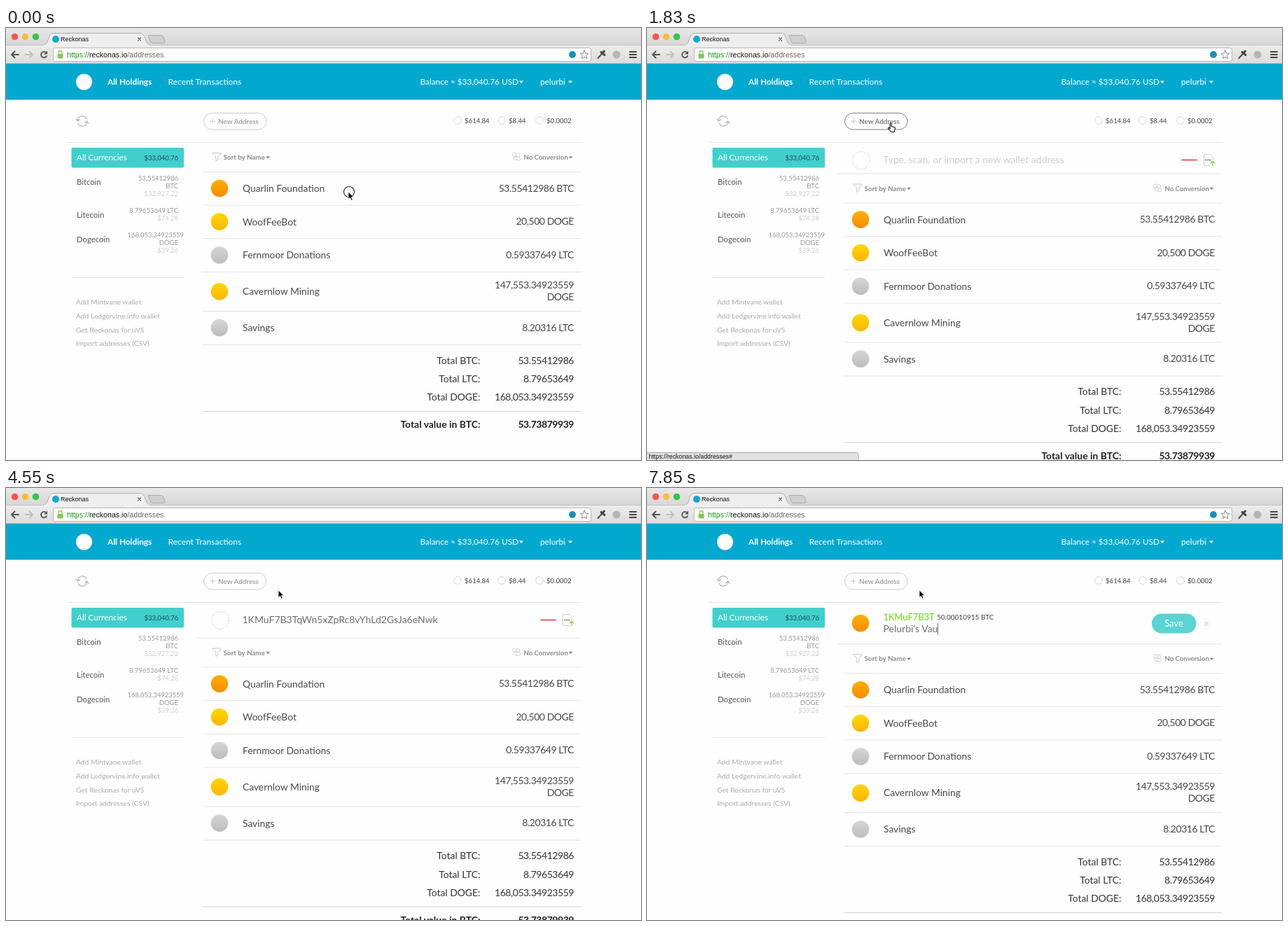
An HTML page that plays this animation: 907x617 px, repeating every 8 s.

```html
<!DOCTYPE html>
<html lang="en">
<head>
<meta charset="utf-8">
<title>Wallet overview</title>
<style>
  html, body { margin: 0; width: 100%; height: 100%; overflow: hidden; background: #fefefe; }
  svg { display: block; width: 100vw; height: 100vh; }
  text { font-family: Lato, "Open Sans", sans-serif; white-space: pre; }
  .chrome { font-family: "Liberation Sans", Arial, sans-serif; }
  .bold { font-weight: 700; }
  .num { letter-spacing: -.45px; }
  .end { text-anchor: end; }
  .line { fill: none; stroke-linecap: round; stroke-linejoin: round; }
</style>
</head>
<body>
<svg id="stage" viewBox="0 0 907 617"></svg>
<script>
const LOOP = 8000;
const SITE = 'reckonas.io';
const NICKNAME = "Pelurbi's Vau";
const ADDRESS = '1KMuF7B3TqWn5xZpRc8vYhLd2GsJa6eNwk';
const ORANGE = 'url(#orange)', YELLOW = 'url(#yellow)', SILVER = 'url(#silver)';

// Markup helpers
const text = (x, y, str, size, fill, cls = '', more = '') =>
  `<text x="${x}" y="${y}" font-size="${size}" fill="${fill}" class="${cls}" ${more}>${str}</text>`;
const rect = (x, y, w, h, fill, more = '') =>
  `<rect x="${x}" y="${y}" width="${w}" height="${h}" fill="${fill}" ${more}/>`;
const disc = (x, y, r, fill, more = '') => `<circle cx="${x}" cy="${y}" r="${r}" fill="${fill}" ${more}/>`;
const path = (d, stroke, width = 1, more = '') =>
  `<path d="${d}" class="line" stroke="${stroke}" stroke-width="${width}" ${more}/>`;
const rule = (x1, x2, y, color = '#e4e4e4') => path(`M${x1} ${y}H${x2}`, color);
const shape = (d, fill, more = '') => `<path d="${d}" fill="${fill}" ${more}/>`;
const dropdown = (x, y, fill) => shape(`M${x} ${y}h6l-3 3.5z`, fill);
const gradient = (id, a, b) =>
  `<linearGradient id="${id}" x2="0" y2="1"><stop stop-color="${a}"/><stop offset="1" stop-color="${b}"/></linearGradient>`;

const defs = `<defs>
  ${gradient('strip', '#e8e8e8', '#d6d6d6')}${gradient('bar', '#ececec', '#dcdcdc')}
  ${gradient('orange', '#fdb000', '#f88a08')}${gradient('yellow', '#ffd800', '#fbb508')}
  ${gradient('silver', '#d6d6d6', '#bcbcbc')}
  <clipPath id="opening"><rect id="openingBox" x="272" y="164" width="550" height="0"/></clipPath></defs>`;

const browser =
  rect(0, 0, 907, 25, 'url(#strip)') + rect(0, 25, 907, 26, 'url(#bar)') + rule(0, 907, 24.5, '#c2c2c2') +
  shape('M53 25C62 24 59 7.500 67 7.500H192C200 7.500 198 24 207 25', '#eee', 'stroke="#adadad"') +
  rect(54, 24, 152, 2, '#eee') +
  shape('M203 10.500H221Q224 10.500 225 13L227 19Q227.500 21.500 224 21.500H209Q207 21.500 206 19Z', '#d0d0d0', 'stroke="#aaa"') +
  ['#fb5650', '#fcbb3f', '#32c547'].map((c, i) => disc(12.5 + 15 * i, 12.5, 4.8, c)).join('') +
  disc(71, 16, 5, '#16a7cc') + text(78, 19.3, 'Reckonas', 9, '#111', 'chrome') +
  path('M188.500 14l4 4m0-4l-4 4', '#555', 1.1) +
  path('M18 38H9M12.500 33.500L8 38l4.500 4.500', '#555', 2) +
  path('M28 38h9M33.500 33.500L38 38l-4.500 4.500', '#c0c0c0', 2) +
  path('M57.500 35.500A4.200 4.200 0 1 0 58 40', '#555', 1.8) + shape('M59 32.500v5h-5z', '#555') +
  rect(67.5, 28.5, 768, 19, '#fff', 'rx="2.500" stroke="#b8b8b8"') +
  rect(73.5, 37, 8, 6.5, '#7fc95b', 'rx="1"') + path('M75 37v-2a2.500 2.500 0 0 1 5 0v2', '#7fc95b', 1.3) +
  text(87, 41.8, `<tspan fill="#149a18">https://</tspan><tspan fill="#111">${SITE}</tspan>/addresses`,
    10.65, '#666', 'chrome') +
  disc(809, 38, 5, '#1c8fb8') +
  path('M826 32l1.800 4 4.200.4-3.200 2.900 1 4.200-3.800-2.200-3.800 2.200 1-4.200-3.200-2.900 4.200-.4z', '#888') +
  path('M845.500 43l5.500-6', '#555', 2.2) + path('M850 34.500l5 4M852.500 35l2-2', '#444', 3) +
  disc(872, 38, 5.5, '#b5b5b5') +
  [34, 38, 42].map(y => path(`M891 ${y}h9`, '#444', 2.1)).join('');

const header =
  rect(0, 51, 907, 51.5, '#03a8cf') + rule(0, 907, 50.5, '#b4bec0') +
  disc(111.5, 77, 11.5, '#fff') +
  text(145, 81, 'All Holdings', 11.8, '#fff', 'bold') +
  text(231.5, 81, 'Recent Transactions', 12, '#fff') +
  text(591.5, 81, 'Balance ≈ $33,040.76 USD', 11.8, '#fff') + dropdown(733, 75.5, '#fff') +
  text(763, 81, 'pelurbi', 11.8, '#fff') + dropdown(803, 75.5, '#fff');

const toolbar =
  path('M102.500 131.500a6.500 6.500 0 0 1 12.500-1.500M115.500 134.500a6.500 6.500 0 0 1-12.500 1.500M100 130l2.500 3 3-2.500M118 136l-2.500-3-3 2.500', '#b5b5b5', 1.2) +
  rect(282.5, 121.5, 89.5, 23.5, '#fff', 'rx="11.750" id="button"') +
  path('M291.500 133h7m-3.500-3.500v7', '#c4c4c4') +
  text(303, 136.5, 'New Address', 10, '#888', '', 'id="buttonLabel"') +
  [[645, '$614.84'], [708, '$8.44'], [762, '$0.0002']].map(([x, price]) =>
    disc(x, 132, 5.3, '#fff', 'stroke="#d6d6d6"') + text(x + 10, 135.6, price, 9.6, '#444')).join('') +
  rule(88, 821, 163.5);

const small = (y, str, fill = '#999') => text(246, y, str, 9.5, fill, 'end');
const sidebar =
  rect(93.5, 171, 160.5, 28.5, '#41cfcc', 'rx="2"') +
  text(101, 189.2, 'All Currencies', 11.8, '#fff') + small(188.5, '$33,040.76', '#1d4c57') +
  text(101, 224, 'Bitcoin', 11.3, '#555') + text(101, 270.5, 'Litecoin', 11.3, '#555') +
  text(101, 305.7, 'Dogecoin', 11.3, '#555') +
  small(217.7, '53.55412986') + small(228.7, 'BTC') + small(240, '$32,927.22', '#ccc') +
  small(264, '8.79653649 LTC') + small(275, '$74.28', '#ccc') +
  text(173.5, 299, '168,053.34923559', 9.4, '#999') + small(310, 'DOGE') + small(321, '$39.26', '#ccc') +
  rule(94, 254, 356.5) +
  ['Add Mintvane wallet', 'Add Ledgervine.info wallet', 'Get Reckonas for uVS', 'Import addresses (CSV)']
    .map((s, i) => text(100, 395 + 19.8 * i, s, 10.3, '#aaa')).join('');

const holding = (y, color, name, ...amount) =>
  disc(305, y, 12.3, color) + text(338, y + 5, name, 13.8, '#484848') +
  amount.map((s, i) => text(811, y + 4.5 + (amount.length > 1 ? 17 * i - 8.7 : 0), s, 14, '#484848', 'num end')).join('');
const total = (y, label, value, cls, color) =>
  text(677.5, y, label, 13.9, color, cls + ' end') + text(811, y, value, 14, color, cls + ' num end');

const list =
  path('M295 178.500h12.500l-4.700 5.500v4l-3 2v-6z', '#c8c8c8') +
  text(310.5, 188, 'Sort by Name', 9.8, '#8c8c8c', 'bold') + dropdown(371, 183.3, '#8c8c8c') +
  [[726, 181], [731, 181.5], [728, 186], [732, 186.5]].map(([x, y]) => disc(x, y, 2.6, '#fff', 'stroke="#d0d0d0"')).join('') +
  text(739.5, 188, 'No Conversion', 9.6, '#8c8c8c', 'bold') + dropdown(803.5, 183.3, '#8c8c8c') +
  [205.5, 253, 300.5, 348.5, 404.5, 452.5].map(y => rule(282, 821, y)).join('') +
  holding(229, ORANGE, 'Quarlin Foundation', '53.55412986 BTC') +
  holding(276.5, YELLOW, 'WoofFeeBot', '20,500 DOGE') +
  holding(324.3, SILVER, 'Fernmoor Donations', '0.59337649 LTC') +
  holding(376.3, YELLOW, 'Cavernlow Mining', '147,553.34923559', 'DOGE') +
  holding(428, SILVER, 'Savings', '8.20316 LTC') +
  total(479.5, 'Total BTC:', '53.55412986', '', '#333') +
  total(506, 'Total LTC:', '8.79653649', '', '#333') +
  total(532.3, 'Total DOGE:', '168,053.34923559', '', '#333') +
  rule(282, 821, 547.5, '#cfcfcf') +
  total(571, 'Total value in BTC:', '53.73879939', 'bold', '#222');

const entryRow =
  disc(306, 189, 12.5, 'none', 'stroke="#ccc" stroke-dasharray="2 1.500"') +
  text(337.5, 193, '', 14, '#ccc', '', 'id="addressField"') +
  path('M764 188.500h21', '#dd3340', 1.6) +
  shape('M795.500 180.500h9l4 4v12h-13z', '#fff', 'stroke="#ccc"') +
  text(797, 190, 'CSV', 4.5, '#555', 'bold') +
  disc(808, 193, 4.2, '#fff') + path('M808 196v-5.500m-2.700 2.500l2.700-2.700 2.700 2.700', '#8fd83c', 1.5);

const foundRow =
  disc(305, 193, 12.3, ORANGE) + text(337.5, 189.3, '1KMuF7B3T', 12.9, '#6bd60a') +
  text(414, 187.8, '50.00010915 BTC', 10, '#444') +
  text(337.5, 206, '', 14, '#ccc', '', 'id="nameField"') +
  rect(721, 179.5, 63.5, 28, '#5ad3d2', 'rx="14"') + text(752.5, 197.5, 'Save', 13, '#fff', '', 'text-anchor="middle"') +
  path('M796.500 191.500l5 5m0-5l-5 5', '#ccc', 1.2);

const pointers = {
  arrow: shape('M0 0v10.500l2.500-2.200 1.800 4 1.800-.8-1.800-3.900h3.400z', '#000', 'stroke="#fff" stroke-width=".8"'),
  hand: shape('M0 1Q1 -.5 2 1v4l4 1q1.700.5 1.200 2.500l-1 4.500h-4.700l-4-5.200q0-1.600 1.500-.8l1 1z', '#fff', 'stroke="#111" stroke-width="1.100"'),
  beam: path('M-2-5.500Q0-5.500 0-4V4Q0 5.500-2 5.500M2-5.500Q0-5.500 0-4M0 4Q0 5.500 2 5.500M-1 1.500h2', '#222', 1.1)
};

document.getElementById('stage').innerHTML = defs + rect(0, 0, 907, 617, '#fefefe') + sidebar + toolbar +
  `<g id="list">${list}</g><g id="edge">${rule(272, 821, 163.5)}</g>
   <g id="entry" clip-path="url(#opening)">${entryRow}</g><g id="found">${foundRow}</g>` +
  rect(337, 0, 1, 17, '#777', 'id="caret"') +
  browser + header +
  `<g id="status">${shape('M-1 618V606.500H299q3 0 3 3V618z', '#e2e2e2', 'id="statusBox" stroke="#a8a8a8"')}
   ${text(2.5, 615.2, `https://${SITE}/addresses#`, 8.8, '#111', 'chrome')}</g>` +
  disc(0, 0, 7.5, 'none', 'id="ring" stroke="#222" stroke-width="1.100"') +
  Object.entries(pointers).map(([k, d]) => `<g id="${k}">${d}</g>`).join('');

// Each track is a list of [start time, ...values], held until the next entry.
const rowHeight = [[0, 0], [1560, 3], [1680, 15], [1830, 44.5], [1980, 50.5], [5090, 59.2]];
const pointerTrack = [
  [0, 489, 234, 'arrow'], [320, 481, 229, 'arrow'], [440, 455, 212, 'arrow'], [560, 415, 182, 'arrow'],
  [680, 378, 156, 'arrow'], [800, 359, 142, 'hand'], [910, 349, 137, 'hand'], [1060, 347, 135.5, 'hand'],
  [1980, 348, 138, 'hand'], [2130, 365, 159, 'arrow'], [2280, 379, 173, 'beam'], [2400, 387, 181.5, 'beam'],
  [3050, 389, 188, 'beam'], [3590, 389, 184, 'beam'], [3680, 389, 176, 'arrow'], [3770, 389, 171, 'arrow'],
  [4250, 389, 165, 'arrow'], [4350, 389, 156, 'arrow'], [4450, 389, 149, 'arrow'], [4550, 389, 146, 'arrow']
];
const ringTrack = [[0, 490, 234], [110], [1410, 348, 134], [1560], [3050, 389, 189], [3140]];
const hoverTrack = [[0, 0], [800, .4], [910, .7], [1060, 1], [2280, .4], [2400, 0]];
const statusTrack = [[0, 0], [1060, '#e2e2e2'], [2280, '#f0f0f0'], [2400, '#fdfdfd'], [2640, 0]];
const caretTrack = [[0, 0], [3140, 1], [3770, 0], [4070, 1], [4450, 0], [5090, 1], [5510, 0], [5650, 1]];
const typedTrack = [[0, 0], [5650, 1], [5890, 2], [6220, 3], [6340, 4], [6450, 6], [6660, 7],
  [6890, 9], [7160, 10], [7430, 11], [7730, 12], [7850, 13]];

const held = (track, t) => track.filter(k => k[0] <= t).pop().slice(1);
const el = id => document.getElementById(id);
const set = (id, attrs) => Object.entries(attrs).forEach(([k, v]) => el(id).setAttribute(k, v));
const show = (id, on) => { el(id).style.display = on ? '' : 'none'; };
const grey = v => `rgb(${v},${v},${v})`;

// Fills a field with its value or placeholder; returns the value's width.
function fillField(id, value, placeholder) {
  const field = el(id);
  field.textContent = value || placeholder;
  field.setAttribute('fill', value ? '#707070' : '#ccc');
  return value ? field.getComputedTextLength() : 0;
}

function render(t) {
  const [height] = held(rowHeight, t);
  const found = t >= 5090;
  set('list', { transform: `translate(0 ${height})` });
  set('edge', { transform: `translate(0 ${height})` });
  set('openingBox', { height });
  show('edge', height > 0);
  show('entry', height > 0 && !found);
  show('found', found);

  const [hover] = held(hoverTrack, t);
  set('button', { stroke: grey(204 - 76 * hover) });
  set('buttonLabel', { fill: grey(136 - 46 * hover) });

  const [statusFill] = held(statusTrack, t);
  show('status', statusFill);
  if (statusFill) set('statusBox', { fill: statusFill });

  const width = found
    ? fillField('nameField', NICKNAME.slice(0, held(typedTrack, t)[0]), 'Give it a nickname...')
    : fillField('addressField', t >= 4070 ? ADDRESS : '', 'Type, scan, or import a new wallet address');
  set('caret', { x: 337 + width, y: found ? 193 : 180 });
  show('caret', held(caretTrack, t)[0]);

  const [ringX, ringY] = held(ringTrack, t);
  show('ring', ringX);
  if (ringX) set('ring', { cx: ringX, cy: ringY });

  const [x, y, kind] = held(pointerTrack, t);
  Object.keys(pointers).forEach(k => show(k, k === kind));
  set(kind, { transform: `translate(${x} ${y})` });
}

const start = performance.now();
function tick() {
  render((performance.now() - start) % LOOP);
  requestAnimationFrame(tick);
}
tick();
</script>
</body>
</html>
```
